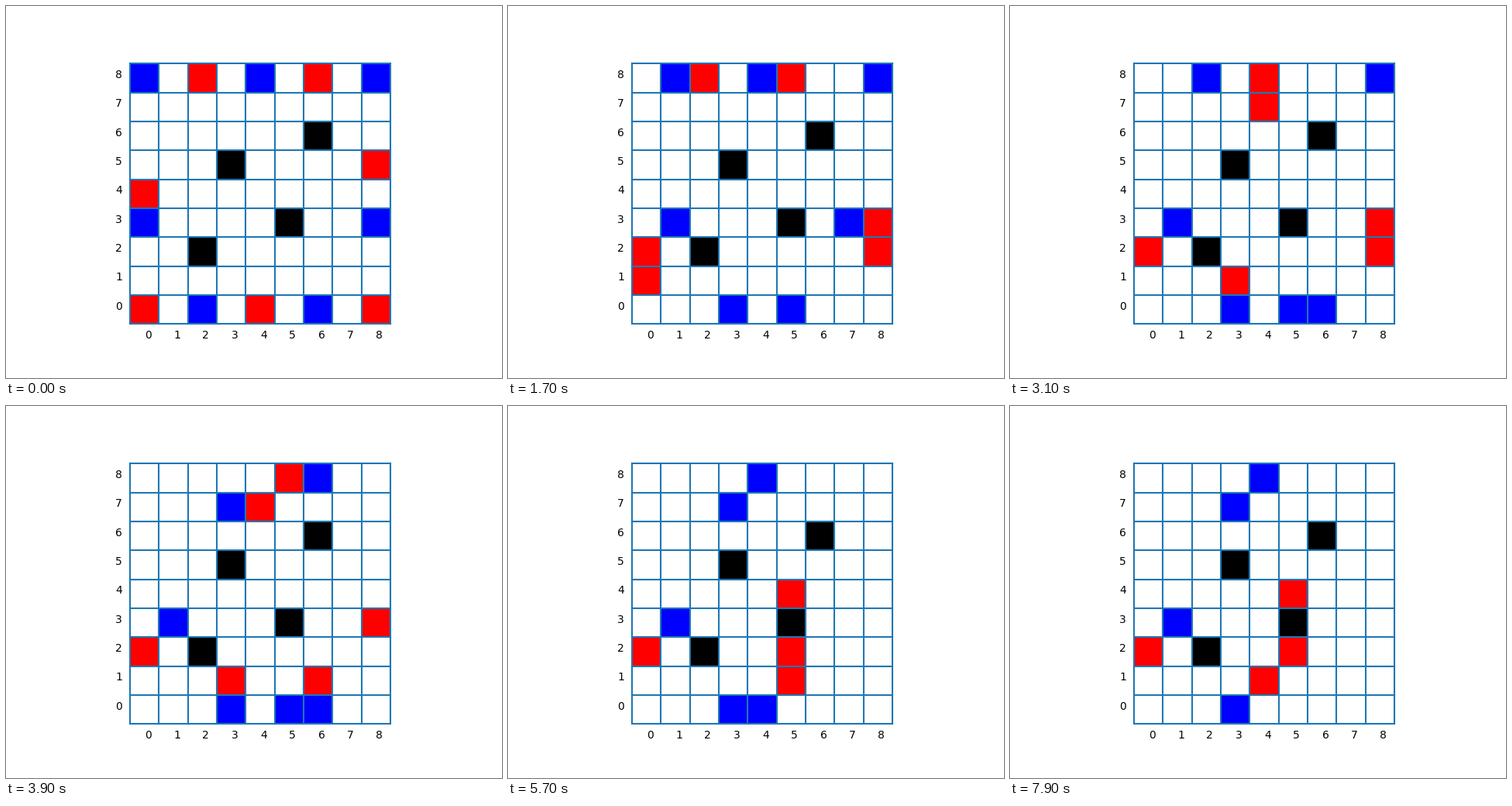
A matplotlib script that plays this animation: 640x480 px, repeating every 8 s.

```python
import matplotlib.pyplot as plt
from matplotlib.animation import FuncAnimation
from matplotlib.patches import Rectangle

SIZE = 9
FRAMES = 80
STEPS = {"L": (-1, 0), "R": (1, 0), "U": (0, 1), "D": (0, -1)}

WALLS = [(3, 5), (6, 6), (5, 3), (2, 2)]
BLUE_START = [(0, 8), (4, 8), (8, 8), (0, 3), (8, 3), (2, 0), (6, 0)]
RED_START = [(2, 8), (6, 8), (8, 5), (0, 4), (0, 0), (4, 0), (8, 0)]

# Each run: the cell a piece starts from and the way it walks
BLUE_RUNS = [
    ((8, 3), "L"), ((0, 3), "R"), ((2, 0), "R"), ((6, 0), "L"),
    ((0, 8), "R"), ((7, 3), "LR" * 3 + "LDDD"), ((1, 8), "R"),
    ((2, 8), "DR"), ((8, 8), "LLDLLU"), ((5, 0), "LU"), ((6, 0), "L"),
    ((4, 1), "R"), ((5, 0), "L"), ((4, 0), "U"), ((1, 3), "DU" * 5),
]
RED_RUNS = [
    ((8, 5), "DD"), ((8, 0), "UU"), ((0, 4), "DD"), ((0, 0), "U"),
    ((6, 8), "L"), ((0, 1), "RRR"), ((2, 8), "RR"), ((5, 8), "DL"),
    ((8, 2), "LLD"), ((4, 8), "RDDDD"), ((8, 3), "LLDL"), ((6, 1), "L"),
    ((5, 2), "LD"), ((5, 1), "U"), ((4, 1), "RL" * 4),
]


def moves(runs):
    for (x, y), path in runs:
        for way in path:
            dx, dy = STEPS[way]
            yield (x, y), (x + dx, y + dy)
            x, y = x + dx, y + dy


def neighbours(cell):
    return [(cell[0] + dx, cell[1] + dy) for dx, dy in STEPS.values()]


def play(board, start, end):
    """Move one piece; rivals beside it with two attackers are taken."""
    board = dict(board)
    side = board.pop(start)
    board[end] = side
    rival = "red" if side == "blue" else "blue"
    for cell in neighbours(end):
        attackers = sum(board.get(n) == side for n in neighbours(cell))
        if board.get(cell) == rival and attackers >= 2:
            del board[cell]
    return board


def all_boards():
    board = {cell: "black" for cell in WALLS}
    board.update({cell: "blue" for cell in BLUE_START})
    board.update({cell: "red" for cell in RED_START})
    boards = [board]
    turns = [moves(BLUE_RUNS), moves(RED_RUNS)]
    for i in range(FRAMES - 1):
        boards.append(play(boards[-1], *next(turns[i % 2])))
    return boards


boards = all_boards()

fig, ax = plt.subplots(figsize=(6.4, 4.8), dpi=100)
ax.set_aspect("equal")
ax.set_xlim(-0.45, SIZE + 0.45)
ax.set_ylim(-0.45, SIZE + 0.45)
ax.axis("off")

for i in range(SIZE + 1):
    ax.plot([0, SIZE], [i, i], color="tab:blue", lw=1.5)
    ax.plot([i, i], [0, SIZE], color="tab:blue", lw=1.5)
for i in range(SIZE):
    ax.text(i + 0.5, -0.5, str(i), fontsize=10, family="DejaVu Sans")
    ax.text(-0.5, i + 0.5, str(i), fontsize=10, family="DejaVu Sans")

cells = {}
for x in range(SIZE):
    for y in range(SIZE):
        cells[x, y] = ax.add_patch(Rectangle((x, y), 1, 1, lw=0, zorder=1))


def draw(frame):
    for cell, patch in cells.items():
        patch.set_facecolor(boards[frame].get(cell, "white"))
    return list(cells.values())


anim = FuncAnimation(fig, draw, frames=FRAMES, interval=100,
                     repeat=True, repeat_delay=0)
plt.show()
```
